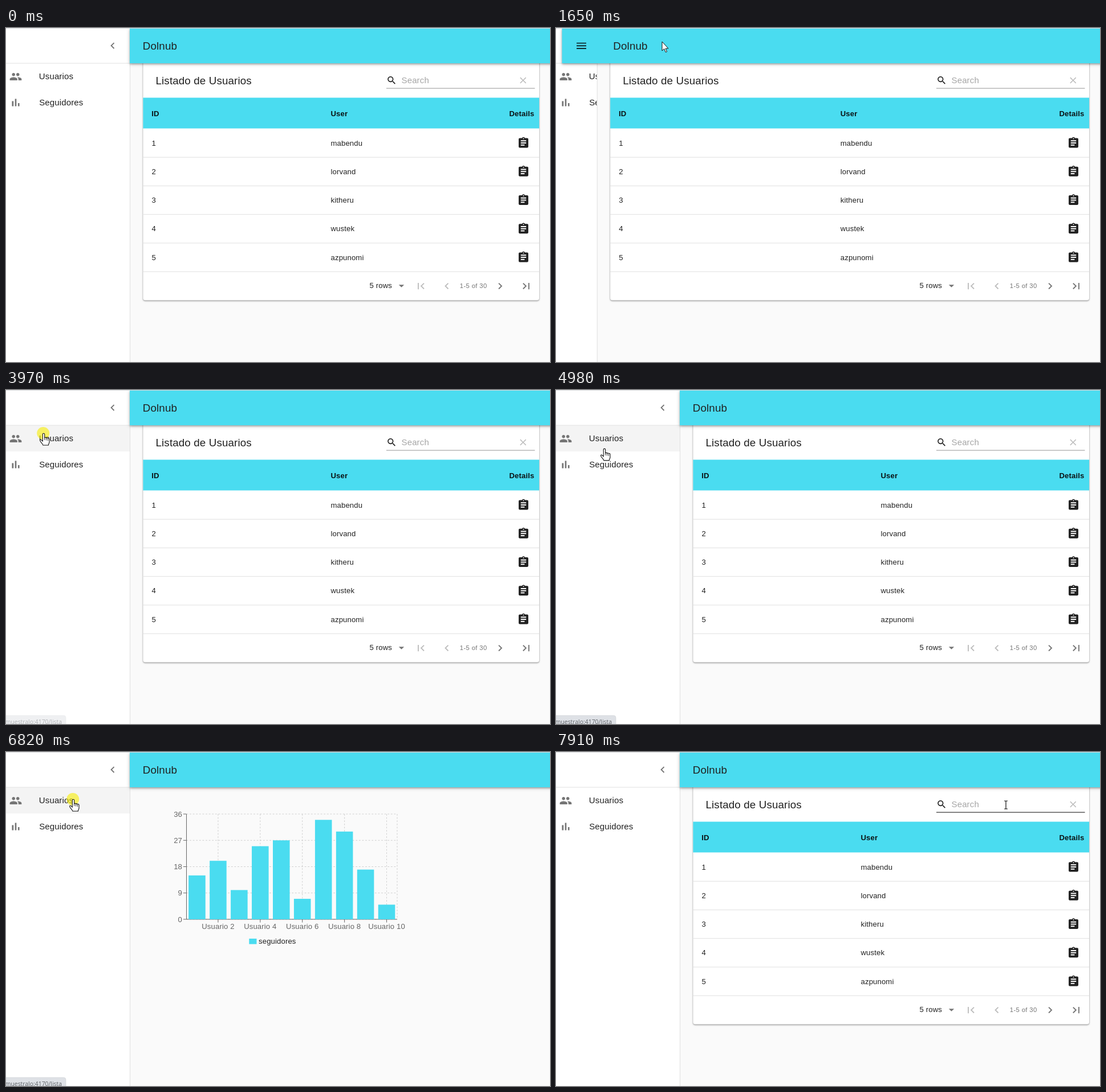
Recreate the animation shown at these times as an HTML page. Size 954 px wide and 587 px high, loop 7.99 s.

```html
<!DOCTYPE html>
<html lang="es">
<head>
<meta charset="utf-8">
<title>Listado</title>
<style>
html, body { margin: 0; width: 100%; height: 100%; overflow: hidden; background: #fafafa; }
svg { display: block; width: 954px; height: 587px; }
text { font: 13.125px "Liberation Sans", Arial, sans-serif; letter-spacing: .14px; fill: #212121; white-space: pre; }
.h6 { font-size: 18.75px; }
.body { font-size: 15px; }
.bold { font-weight: 700; fill: #0b1416; }
.hint { fill: #a6a6a6; }
.caption { font-size: 11.25px; letter-spacing: .375px; fill: #757575; }
.tick { fill: #666; }
.url { font: 10.4px "Open Sans", "Noto Sans", sans-serif; letter-spacing: 0; fill: #5f6368; }
.bar { filter: drop-shadow(0 2px 1.5px rgba(0,0,0,.24)) drop-shadow(0 1px 3px rgba(0,0,0,.2)); }
.card { filter: drop-shadow(0 1px 1px rgba(0,0,0,.34)) drop-shadow(0 1px 1.5px rgba(0,0,0,.16)); }
</style>
</head>
<body>
<svg id="stage" viewBox="0 0 954 587"></svg>
<script>
const LOOP = 7990, CYAN = '#4adcf0', GREY = '#757575', PALE = '#bdbdbd', INK = '#212121';
const CLOSE = 1495, OPEN = 3060, CHART_IN = 5495, CHART_OUT = 6975;

const ICONS = {
  people: 'M16 11c1.66 0 2.99-1.34 2.99-3S17.66 5 16 5c-1.66 0-3 1.34-3 3s1.34 3 3 3zm-8 0c1.66 0 2.99-1.34 2.99-3S9.66 5 8 5C6.34 5 5 6.34 5 8s1.34 3 3 3zm0 2c-2.33 0-7 1.17-7 3.5V19h14v-2.5c0-2.33-4.67-3.5-7-3.5zm8 0c-.29 0-.62.02-.97.05 1.16.84 1.97 1.97 1.97 3.45V19h6v-2.5c0-2.33-4.67-3.5-7-3.5z',
  chart: 'M5 9.2h3V19H5zM10.6 5h2.8v14h-2.8zm5.6 8H19v6h-2.8z',
  left: 'M15.41 7.41L14 6l-6 6 6 6 1.41-1.41L10.83 12z',
  right: 'M10 6L8.59 7.41 13.17 12l-4.58 4.59L10 18l6-6z',
  first: 'M18.41 16.59L13.82 12l4.59-4.59L17 6l-6 6 6 6zM6 6h2v12H6z',
  last: 'M5.59 7.41L10.18 12l-4.59 4.59L7 18l6-6-6-6zM16 6h2v12h-2z',
  menu: 'M3 18h18v-2H3v2zm0-5h18v-2H3v2zm0-7v2h18V6H3z',
  search: 'M15.5 14h-.79l-.28-.27C15.41 12.59 16 11.11 16 9.5 16 5.91 13.09 3 9.5 3S3 5.91 3 9.5 5.91 16 9.5 16c1.61 0 3.09-.59 4.23-1.57l.27.28v.79l5 4.99L20.49 19l-4.99-5zm-6 0C7.01 14 5 11.99 5 9.5S7.01 5 9.5 5 14 7.01 14 9.5 11.99 14 9.5 14z',
  clear: 'M19 6.41L17.59 5 12 10.59 6.41 5 5 6.41 10.59 12 5 17.59 6.41 19 12 13.41 17.59 19 19 17.59 13.41 12z',
  drop: 'M7 10l5 5 5-5z',
  sheet: 'M19 3h-4.18C14.4 1.84 13.3 1 12 1c-1.3 0-2.4.84-2.82 2H5c-1.1 0-2 .9-2 2v14c0 1.1.9 2 2 2h14c1.1 0 2-.9 2-2V5c0-1.1-.9-2-2-2zm-7 0c.55 0 1 .45 1 1s-.45 1-1 1-1-.45-1-1 .45-1 1-1zm2 14H7v-2h7v2zm3-4H7v-2h10v2zm0-4H7V7h10v2z'
};
const POINTERS = {
  arrow: '<path d="M0 0V16l3.7-3.4 2.6 6 2.3-1-2.6-5.6H11z" fill="#fff" stroke="#111" stroke-linejoin="round"/>',
  hand: '<path d="M-1.7 2a1.7 1.7 0 0 1 3.4 0v6.2a1.5 1.5 0 0 1 2.9.4 1.5 1.5 0 0 1 2.8.7 1.4 1.4 0 0 1 2.6.8v5.4c0 2-1.6 2.6-1.6 5.5h-9.5c0-2.2-4.6-5.4-5.3-8.3-.3-1.6 1.5-2 2.5-.8l2.2 2.2z" fill="#fff" stroke="#111" stroke-width="1.1" stroke-linejoin="round"/><path d="M1.7 8v4M4.6 9v3.5M7.4 10v3" stroke="#111" stroke-width=".9"/>',
  beam: '<path d="M-3-7h2q1 0 1 1V6q0 1-1 1h-2M3-7H1Q0-7 0-6V6q0 1 1 1h2" fill="none" stroke="#111" stroke-width="1.2"/>'
};
const USERS = ['mabendu', 'lorvand', 'kitheru', 'wustek', 'azpunomi'];
const FOLLOWERS = [15, 20, 10, 25, 27, 7, 34, 30, 17, 5];

// time, x, y of the pointer tip
const PATH = [
  [70, 757, 510], [830, 190, 45], [910, 188, 34], [980, 186, 24], [1700, 186, 24],
  [2100, 19, 45], [2250, 16, 42], [3280, 16, 42], [3720, 66, 76], [4660, 66, 76],
  [5280, 102, 127], [5850, 102, 127], [6190, 118, 83], [7050, 118, 83], [7880, 789, 93]
];
// press, release, centre and full radius of the ripple, list row it is clipped to
const CLICKS = [
  { down: 1320, up: 1490, x: 187, y: 31, r: 22.5 },
  { down: 2970, up: 3060, x: 25, y: 31, r: 22.5 },
  { down: 3950, up: 4090, x: 66, y: 76, r: 155, row: 0 },
  { down: 5330, up: 5490, x: 102, y: 127, r: 119, row: 1 },
  { down: 6820, up: 6970, x: 118, y: 83, r: 131, row: 0 }
];

const clamp = v => Math.max(0, Math.min(1, v));
const ramp = (t, from, span) => clamp((t - from) / span);
const bezier = (x1, y1, x2, y2) => x => {
  if (x <= 0 || x >= 1) return clamp(x);
  const at = (a, b, u) => 3 * a * u * (1 - u) ** 2 + 3 * b * u * u * (1 - u) + u ** 3;
  let lo = 0, hi = 1;
  for (let i = 0; i < 24; i++) {
    const mid = (lo + hi) / 2;
    if (at(x1, x2, mid) < x) lo = mid; else hi = mid;
  }
  return at(y1, y2, lo);
};
const sharp = bezier(.4, 0, .6, 1), inOut = bezier(.4, 0, .2, 1), ease = bezier(.25, .1, .25, 1);

const rect = (x, y, w, h, fill, more = '') =>
  `<rect x="${x}" y="${y}" width="${w}" height="${h}" fill="${fill}" ${more}/>`;
const text = (x, y, str, cls = '', anchor = 'start') =>
  `<text x="${x}" y="${y}" class="${cls}" text-anchor="${anchor}">${str}</text>`;
const icon = (name, cx, cy, fill = GREY, size = 22.5) =>
  `<path d="${ICONS[name]}" fill="${fill}" transform="translate(${cx - size / 2} ${cy - size / 2}) scale(${size / 24})"/>`;
const line = (x1, y1, x2, y2, stroke, more = '') =>
  `<path d="M${x1} ${y1}L${x2} ${y2}" stroke="${stroke}" ${more}/>`;
const circle = (x, y, r, fill, alpha) =>
  `<circle cx="${x}" cy="${y}" r="${r}" fill="${fill}" opacity="${alpha}"/>`;

function pointerAt(t) {
  const i = PATH.findIndex(p => p[0] > t);
  if (i < 0) return PATH[PATH.length - 1].slice(1);
  if (i === 0) return PATH[0].slice(1);
  const [t0, x0, y0] = PATH[i - 1], [t1, x1, y1] = PATH[i];
  const u = (t - t0) / (t1 - t0), k = u * u * (3 - 2 * u);
  return [x0 + (x1 - x0) * k, y0 + (y1 - y0) * k];
}

function ripple(t, c) {
  if (t < c.down || t > c.up + 550) return '';
  const grow = inOut(ramp(t, c.down, 550));
  const alpha = (.1 + .2 * grow) * (1 - inOut(ramp(t, c.up, 550)));
  const clip = c.row === undefined ? '' : `clip-path="url(#row${c.row})"`;
  return `<g ${clip}>${circle(c.x, c.y, c.r * grow, '#000', alpha)}</g>`;
}

function table(t, left, shift) {
  const userX = t >= CHART_OUT ? 534.5 : 569.5 - shift * .487;
  const under = ramp(t, 7700, 200);
  let s = rect(left, 40, 935 - left, 438.5, '#fff', 'rx="3.75" class="card"');
  s += text(left + 22.1, 98.5, 'Listado de Usuarios', 'h6');
  s += icon('search', 676.3, 92, INK, 18.75) + text(693.5, 97, 'Search', 'body hint') + icon('clear', 906.8, 92, PALE, 18.75);
  s += line(667, 106, 927.5, 106, '#949494');
  s += line(667, 106, 927.5, 106, '#555', `stroke-width="1.6" opacity="${under * .8}"`);
  s += rect(left, 122.5, 935 - left, 54, CYAN);
  s += text(left + 14.8, 154.5, 'ID', 'bold') + text(userX, 154.5, 'User', 'bold') + text(882.5, 154.5, 'Details', 'bold');
  USERS.forEach((name, i) => {
    const y = 202 + 50.25 * i;
    s += text(left + 15, y + 4.7, i + 1) + text(userX, y + 4.7, name) + icon('sheet', 907.5, y, INK);
    s += line(left, y + 25.2, 935, y + 25.2, '#e0e0e0');
  });
  s += text(637.5, 457.3, '5 rows') + icon('drop', 693.5, 453);
  s += icon('first', 727.7, 453.5, PALE) + icon('left', 773, 453.5, PALE);
  s += text(795.8, 457, '1-5 of 30', 'caption');
  return s + icon('right', 866.6, 453.5) + icon('last', 912.2, 453.5);
}

function chart(t) {
  const x0 = 316.5, y0 = 294, step = 36.95, unit = 185 / 36;
  const grow = ease(ramp(t, 5540, 400));
  const dash = 'stroke-dasharray="2.8 2.8" stroke-width=".94"';
  let grid = '', axes = '', bars = '';
  for (let v = 0; v <= 36; v += 9) {
    const y = y0 - v * unit;
    grid += line(x0, y, x0 + step * 10, y, '#ccc', dash);
    axes += line(x0 - 5.6, y, x0, y, '#666') + text(309, y + 4.7, v, 'tick', 'end');
  }
  FOLLOWERS.forEach((v, i) => {
    const x = x0 + step * i, mid = x + step / 2, h = v * unit * grow;
    bars += rect(x + step * .1, y0 - h, step * .8, h, CYAN);
    if (i % 2) {
      grid += line(mid, 109, mid, y0, '#ccc', dash);
      axes += line(mid, y0, mid, y0 + 5.6, '#666') + text(mid, 311, 'Usuario ' + (i + 1), 'tick', 'middle');
    }
  });
  grid += line(x0 + step * 10, 109, x0 + step * 10, y0, '#ccc', dash);
  axes += line(x0, 109, x0, y0, '#666') + line(x0, y0, x0 + step * 10, y0, '#666');
  return grid + axes + bars + rect(426.3, 328, 13.2, 9.6, CYAN) + text(443, 336.7, 'seguidores');
}

function status(t, row) {
  const alpha = Math.min(ramp(t, 3850, 250), 1 - ramp(t, 7550, 200));
  if (alpha <= 0) return '';
  const [w, url] = row === 1 ? [133, 'muestralo:4170/resultados'] : [105, 'muestralo:4170/lista'];
  return `<g opacity="${alpha}">${rect(-6, 572, w + 6, 22, '#dee1e6', 'rx="4" stroke="#cfd2d6" stroke-width=".6"')}${text(w - 7, 586.6, url, 'url', 'end')}</g>`;
}

function scene(t) {
  const closed = t >= CLOSE && t < OPEN;
  const p = t < OPEN ? sharp(ramp(t, CLOSE, 195)) : 1 - sharp(ramp(t, OPEN, 225));
  const edge = 217 - 159 * p, head = 217 - 226 * p;
  const [x, y] = pointerAt(t);
  const near = (cx, cy) => Math.hypot(x - cx, y - cy) < 22.5;
  const row = !closed && x < 217 && y > 62 && y < 153 ? (y < 108 ? 0 : 1) : -1;
  const overMenu = closed && near(25, 31);
  const hand = row >= 0 || overMenu || (!closed && p < .1 && near(187, 31));
  const kind = hand ? 'hand' : x > 667 && x < 895 && y > 75 && y < 107 ? 'beam' : 'arrow';

  let s = `<defs><clipPath id="drawer">${rect(0, 0, edge, 587, '#000')}</clipPath>`;
  s += [0, 1].map(i => `<clipPath id="row${i}">${rect(0, 62.5 + 45.5 * i, edge, 45.5, '#000')}</clipPath>`).join('') + '</defs>';
  s += rect(0, 0, 954, 587, '#fafafa');
  s += t >= CHART_IN && t < CHART_OUT ? chart(t) : table(t, edge + 23.4, 159 * p);

  s += rect(0, 0, edge, 587, '#fff') + '<g clip-path="url(#drawer)">';
  if (row >= 0) s += rect(0, 62.5 + 45.5 * row, edge, 45.5, '#f4f4f4');
  s += line(0, 62, edge, 62, '#e0e0e0') + icon('left', 187, 31);
  s += icon('people', 17, 85.5) + text(57.8, 90.3, 'Usuarios', 'body');
  s += icon('chart', 17, 131) + text(58.2, 135.7, 'Seguidores', 'body');
  s += CLICKS.filter(c => c.x !== 25).map(c => ripple(t, c)).join('') + '</g>';
  s += line(edge + .5, 0, edge + .5, 587, '#e0e0e0');

  s += rect(head, 1, 980 - head, 61, CYAN, 'class="bar"');
  if (closed) {
    if (overMenu) s += circle(head + 34, 31, 22.5, '#000', .06);
    s += icon('menu', head + 34, 31.3, 'rgba(0,0,0,.8)');
  }
  s += ripple(t, CLICKS[1]);
  s += text(head + (closed ? 89.8 : 22.8), 38, 'Dolnub', 'h6');
  s += rect(0, 0, 954, 1, '#dadcde') + status(t, row);

  if (t >= 70) {
    if (CLICKS.some(c => t >= c.down && t < c.up)) s += circle(x - .8, y, 11, '#f7ec00', .6);
    s += `<g transform="translate(${x} ${y})">${POINTERS[kind]}</g>`;
  }
  return s;
}

const stage = document.getElementById('stage');
const start = performance.now();
function draw() {
  stage.innerHTML = scene((performance.now() - start) % LOOP);
  requestAnimationFrame(draw);
}
draw();
</script>
</body>
</html>
```
